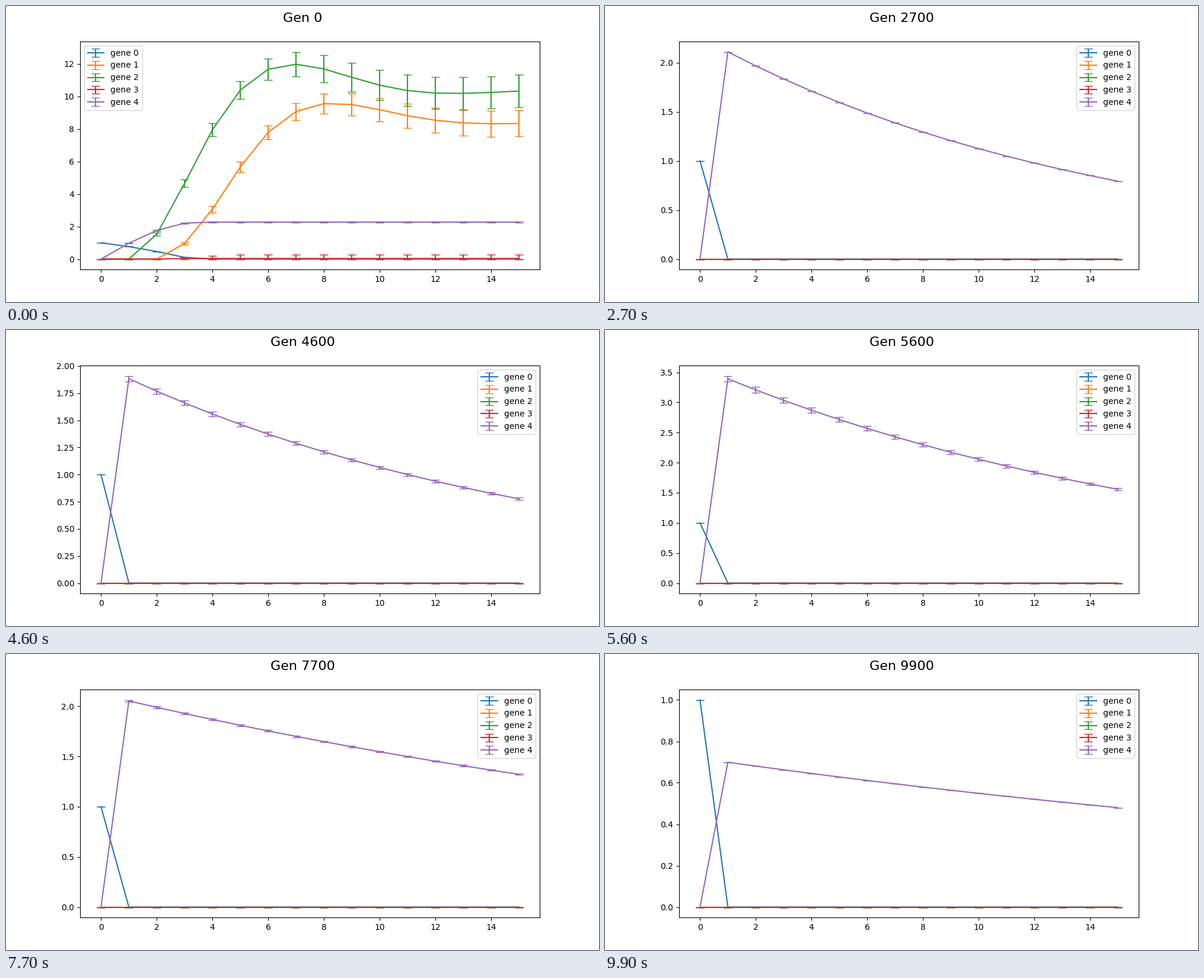
A matplotlib script that plays this animation: 1000x500 px, repeating every 10 s.

```python
import matplotlib.pyplot as plt
import numpy as np
from matplotlib.animation import FuncAnimation

FRAMES = 100
JUMP = 93  # the last network replaces the one before it here
T = np.arange(16)
ZERO = np.zeros(len(T))


def ringing(start, level, gain, decay, freq, cross):
    """Rise from zero, overshoot and settle at a level."""
    s = T - start
    wave = gain * np.exp(-decay * s) * np.sin(freq * (s - cross))
    return np.where(s > 0, level * (1 + wave), 0)


def widening(start, size):
    s = np.maximum(T - start, 0)
    return size * (1 - np.exp(-(s / 4.8) ** 1.5))


def first_network():
    means = [
        np.maximum(1 - .2 * T - .033 * T ** 2, 0),
        ringing(2, 8.48, 1.29, .335, .537, 4.45),
        ringing(1, 10.43, 1.185, .325, .548, 4.02),
        np.where(T > 2, .035, 0),
        2.275 * np.sin(np.pi / 2 * np.minimum(T / 3.55, 1)),
    ]
    errors = [
        ZERO,
        widening(2, .81),
        widening(1, 1.01),
        .08 * np.clip(T - 2, 0, 3),
        .013 * np.clip(T, 0, 3),
    ]
    return means, errors


def later_network(i):
    """Gene 0 triggers gene 4, which then decays exponentially."""
    if i < JUMP:
        peak = np.interp(i, [1, 3, 10, 20, 27, 33, 46, 62, 67, 73, 87],
                         [17.5, 4.6, 2.606, 2, 2.111, 1.97, 1.884,
                          4.3, 3.614, 1.95, 2.312])
        rate = np.interp(i, [10, 27, 46, 67, 87],
                         [.0684, .0699, .0633, .0472, .01565])
        prop = np.interp(i, [27, 46, 67, 82], [0, .0135, .0152, 0])
        late = np.interp(i, [77, 87], [0, .052])
    else:
        peak, rate, prop, late = .699, .02685, 0, 0
    age = np.maximum(T - 1, 0)
    pulse = np.where(T > 0, peak * np.exp(-rate * age), 0)
    trigger = np.where(T == 0, 1, 0)
    means = [trigger, ZERO, ZERO, ZERO, pulse]
    return means, [ZERO] * 4 + [prop * pulse + late * age / 14]


fig, ax = plt.subplots(figsize=(10, 5), dpi=100)
title = fig.suptitle("Gen 0", fontsize=16, y=.978)


def draw(i):
    ax.clear()
    means, errors = later_network(i) if i else first_network()
    for gene, (mean, err) in enumerate(zip(means, errors)):
        # bars stop at zero
        ax.errorbar(T, mean, yerr=[np.minimum(err, mean), err],
                    capsize=5, label=f"gene {gene}")
    ax.legend(loc="best")
    title.set_text(f"Gen {i * 100}")
    return []


anim = FuncAnimation(fig, draw, frames=FRAMES, init_func=lambda: draw(0),
                     interval=100, repeat=True, repeat_delay=0, blit=False)
plt.show()
```
